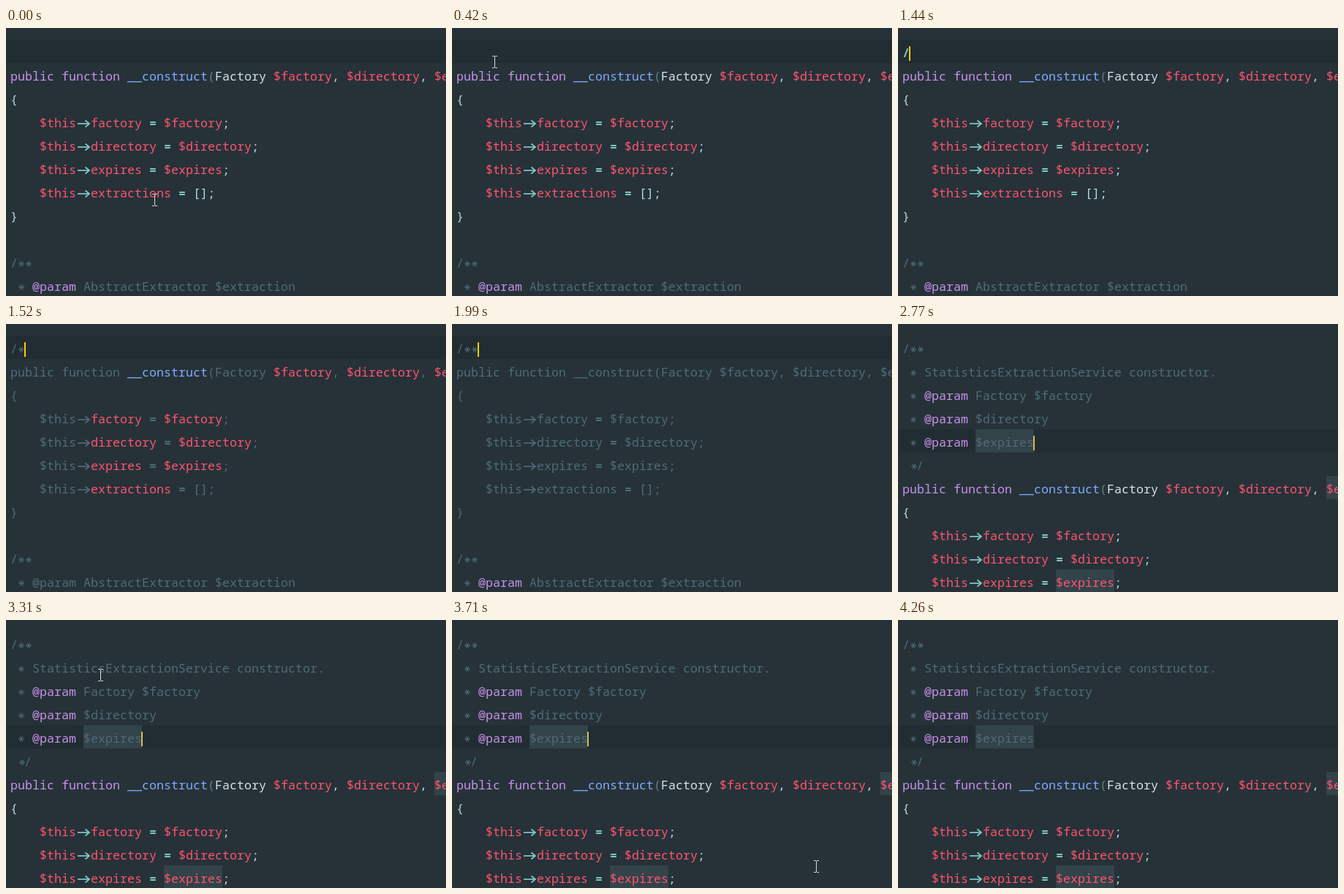
Recreate the animation shown at these times as an HTML page with a canvas. Size 602 px wide and 367 px high, loop 4.34 s.

```html
<!DOCTYPE html>
<html lang="en">
<head>
<meta charset="utf-8">
<title>Doc comment completion</title>
<style>
html, body { margin: 0; width: 100%; height: 100%; overflow: hidden; background: #263238; }
canvas { display: block; width: 602px; height: 367px; }
</style>
</head>
<body>
<canvas id="stage" width="602" height="367"></canvas>
<script>
const ctx = document.getElementById('stage').getContext('2d');
const W = 602, H = 367, LOOP = 4340;
const LEFT = 6, COL = 10, ROW = 32, TOP = 16, BASE = 40;
const FONT = '16.667px "Noto Sans Mono", "DejaVu Sans Mono", monospace';

const COLORS = {
  keyword: '#c792ea', tag: '#c792ea', method: '#82aaff', self: '#ff5370',
  param: '#ff5370', field: '#ff5370', operator: '#80cbc4', punct: '#b2dcde',
  paren: '#607d8b', plain: '#d3e3e8', comment: '#4f6b78'
};
const SEMANTIC = ['method', 'param', 'field'];

const CODE = [
  'public function __construct(Factory $factory, $directory, $expires)',
  '{',
  '    $this->factory = $factory;',
  '    $this->directory = $directory;',
  '    $this->expires = $expires;',
  '    $this->extractions = [];',
  '}',
  '',
  '/**',
  ' * @param AbstractExtractor $extraction'
];
const DOC = [
  '/**',
  ' * StatisticsExtractionService constructor.',
  ' * @param Factory $factory',
  ' * @param $directory',
  ' * @param $expires',
  ' */'
];

const smooth = p => {
  p = Math.min(1, Math.max(0, p));
  return p * p * (3 - 2 * p);
};
const mix = (a, b, p) => a + (b - a) * p;
const colX = col => LEFT + COL * col;

function rect(x, y, w, h, color) {
  ctx.fillStyle = color;
  ctx.fillRect(x, y, w, h);
}

function line(color, width, ...pts) {
  ctx.strokeStyle = color;
  ctx.lineWidth = width;
  ctx.beginPath();
  pts.forEach(([x, y], i) => i ? ctx.lineTo(x, y) : ctx.moveTo(x, y));
  ctx.stroke();
}

function star(x, y, color) {
  for (let i = 0; i < 3; i++) {
    const dx = 4 * Math.cos(i * Math.PI / 3), dy = 4 * Math.sin(i * Math.PI / 3);
    line(color, 1.2, [x - dx, y - dy], [x + dx, y + dy]);
  }
}

function arrow(x, y, color) {
  line(color, 1.7, [x + 2, y], [x + 18, y]);
  line(color, 1.7, [x + 12.5, y - 4.5], [x + 18, y], [x + 12.5, y + 4.5]);
}

function kindOf(word, prev) {
  if (word === 'public' || word === 'function') return 'keyword';
  if (word === '__construct') return 'method';
  if (word === '$this') return 'self';
  if (word[0] === '$') return 'param';
  if (prev === '->') return 'field';
  if (word === '->' || word === '=' || word === '/') return 'operator';
  if (word === '(') return 'paren';
  return /\w/.test(word) ? 'plain' : 'punct';
}

function colorOf(kind, look) {
  if (look.semantic && SEMANTIC.includes(kind)) return COLORS[kind];
  if (look.commented) return COLORS.comment;
  return kind === 'method' || kind === 'field' ? COLORS.plain : COLORS[kind];
}

function drawLine(text, row, look) {
  const y = BASE + ROW * row;
  const isDoc = /^( \*|\/\*)/.test(text);
  const closing = text === ' */';
  let prev = '';
  for (const { 0: word, index } of text.matchAll(/->|[$@]?\w+|\S/g)) {
    const x = colX(index);
    const kind = word[0] === '@' ? 'tag' : kindOf(word, prev);
    let color = colorOf(kind, look);
    if (isDoc) color = kind === 'tag' && look.tags ? COLORS.tag : COLORS.comment;
    prev = word;
    if (word === '->') arrow(x, y - 5, color);
    else if (word === '*') star(x + (closing ? 6 : 5), y - 5, color);
    else {
      ctx.font = (kind === 'operator' && !isDoc ? 'bold ' : kind === 'tag' ? '500 ' : '') + FONT;
      ctx.fillStyle = color;
      ctx.fillText(word, closing ? x - 1 : x, y);
    }
  }
}

function caret(col, row, color, alpha = 1) {
  ctx.globalAlpha = alpha;
  rect(colX(col) - 1, 25 + ROW * row, 2, 20, color);
  ctx.globalAlpha = 1;
}

function pointer(x, y) {
  x = Math.round(x);
  y = Math.round(y);
  const color = '#d8dcde';
  rect(x, y - 7, 1, 15, color);
  for (const edge of [y - 8, y + 8]) {
    rect(x - 3, edge, 3, 1, color);
    rect(x + 1, edge, 3, 1, color);
  }
}

function drawPointer(t) {
  if (t < 820) {
    const k = t >= 500 ? 7 : Math.min(6, Math.floor(t / 70));
    pointer(mix(203, 58, smooth(k / 6)), mix(235, 42, smooth(k / 6.6)));
  } else if (t >= 3310 && t < 3870) {
    const p = smooth(Math.floor((t - 3310) / 80) / 6);
    pointer(mix(129, 528, p), mix(75, 358, p));
  }
}

function drawHighlights() {
  const color = '#33434a';
  rect(colX(10), TOP + ROW * 4, 80, ROW, color);
  rect(colX(58), TOP + ROW * 6, 80, ROW, color);
  rect(colX(21), TOP + ROW * 10, 80, ROW, color);
}

function draw(t) {
  const expanded = t >= 2380;
  const typed = t < 1440 ? '' : t < 1520 ? '/' : t < 1990 ? '/*' : '/**';
  const look = {
    commented: t >= 1520 && !expanded,
    semantic: t < 1760 || t >= 2610,
    tags: t < 1520 || t >= 1990
  };
  const lines = (expanded ? DOC : [typed]).concat(CODE);

  rect(0, 0, W, H, '#263238');
  rect(0, TOP + (expanded ? ROW * 4 : 0), W, ROW, '#212d32');
  if (t >= 2770) drawHighlights();
  lines.slice(0, 11).forEach((text, row) => drawLine(text, row, look));

  if (expanded) {
    if (t < 4260) caret(18, 4, '#d6c252', t < 4180 ? 1 : 0.5);
  } else if (t >= 660) {
    caret(typed.length, 0, '#ffcc00');
  }
  drawPointer(t);
}

const start = performance.now();
function tick() {
  draw((performance.now() - start) % LOOP);
  requestAnimationFrame(tick);
}
tick();
</script>
</body>
</html>
```
